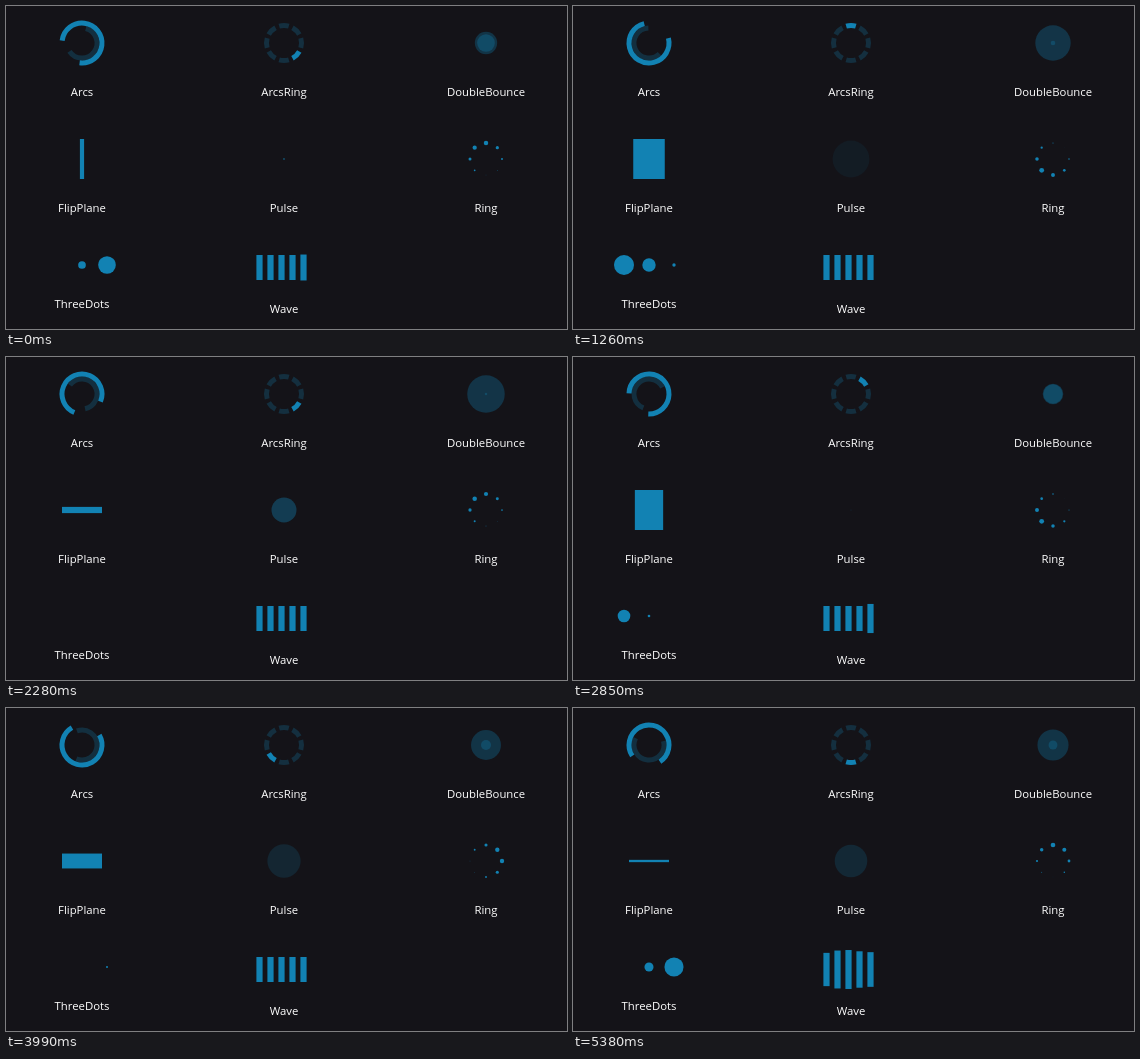
An HTML page for the animation above (5480 ms loop, 561x323 px).

```html
<!DOCTYPE html>
<html lang="en">
<head>
<meta charset="utf-8">
<title>Loading indicators</title>
<style>
  html, body { margin: 0; width: 100%; height: 100%; overflow: hidden; background: #141318; }
  svg { display: block; width: 561px; height: 323px; }
  text { font: 11.35px "Open Sans", "Noto Sans", sans-serif; fill: #fff; text-anchor: middle; }
</style>
</head>
<body>
<svg id="stage" viewBox="0 0 561 323"></svg>
<script>
const BLUE = '#1282b3';
const DIM = 0.25;
const LOOP = 5480;
const START = 19.558;   // indicator clock at the start of the loop, in seconds
const RATE = 1.053;     // indicator seconds per second of playback

// Runs of evenly spaced redraws: first, last, count.
const RUNS = [
  [0, 0, 1], [60, 600, 7], [690, 1170, 8], [1260, 1790, 9], [1850, 2340, 7],
  [2400, 2940, 9], [3000, 3530, 8], [3620, 4130, 8], [4190, 4670, 8],
  [4750, 5290, 9], [5380, 5380, 1]
];
const ticks = RUNS.flatMap(([first, last, count]) =>
  Array.from({ length: count }, (_, i) =>
    Math.round((first + (last - first) * i / Math.max(1, count - 1)) / 10) * 10));

const stage = document.getElementById('stage');

function add(tag, attrs) {
  const el = document.createElementNS('http://www.w3.org/2000/svg', tag);
  set(el, attrs);
  return stage.appendChild(el);
}

function set(el, attrs) {
  for (const key in attrs) el.setAttribute(key, attrs[key]);
}

const many = (count, make) => Array.from({ length: count }, (_, i) => make(i));
const mod = (a, b) => ((a % b) + b) % b;
const clamp = x => Math.max(0, Math.min(1, x));
const tri = x => 1 - Math.abs(2 * mod(x, 1) - 1);

function label(name, x, y) {
  add('text', { x, y }).textContent = name;
}

function dot(cx, cy, opacity = 1) {
  return add('circle', { cx, cy, r: 0, fill: BLUE, opacity });
}

// Angles in degrees, clockwise from the top.
function arc(cx, cy, r, from, span, opacity) {
  const at = deg => {
    const a = deg * Math.PI / 180;
    return `${cx + r * Math.sin(a)} ${cy - r * Math.cos(a)}`;
  };
  return add('path', {
    d: `M${at(from)}A${r} ${r} 0 ${span > 180 ? 1 : 0} 1 ${at(from + span)}`,
    fill: 'none', stroke: BLUE, 'stroke-width': 5, opacity
  });
}

label('Arcs', 76, 90);
label('ArcsRing', 278, 90);
label('DoubleBounce', 480, 90);
label('FlipPlane', 76, 206);
label('Pulse', 278, 206);
label('Ring', 480, 206);
label('ThreeDots', 76, 302);
label('Wave', 278, 307);

const outer = arc(76, 37, 20, 90, 270, 1);
const inner = arc(76, 37, 15, 295, 222, DIM);
const segments = many(8, i => arc(278, 37, 17.5, i * 45 - 16, 32, DIM));
const bounces = many(2, () => dot(480, 37, 0.3));
const plane = add('rect', { fill: BLUE });
const pulse = dot(278, 153);
const ring = many(8, i => {
  const a = i * Math.PI / 4;
  return dot(480 + 16 * Math.sin(a), 153 - 16 * Math.cos(a));
});
const trio = many(3, i => dot(51 + 25 * i, 259));
const bars = many(5, i => add('rect', { x: 250.4 + 11 * i, width: 6.2, fill: BLUE }));

function drawPlane(s) {
  const phase = mod(s, 1.6);
  const size = 40 * Math.abs(1 - 2.5 * (phase % 0.8));
  const w = phase < 0.8 ? size : 40;
  const h = phase < 0.8 ? 40 : size;
  set(plane, { x: 76 - w / 2, y: 153 - h / 2, width: w, height: h });
}

// Half a second up, a short hold, half a second down.
function swell(x) {
  return clamp(Math.min(2 * x, 2 * (1.1 - x)));
}

// All bars start rising together; each one peaks a little later than the last.
function barHeight(s, i) {
  const lead = 0.02;
  const x = mod(s + lead, 1);
  const peak = 0.13 + lead + 0.06 * i;
  const level = x < peak ? x / peak : 1 - (x - peak) / 0.2;
  return 25 + 15.5 * clamp(level);
}

function draw(ms) {
  const s = START + RATE * ms / 1000;

  set(outer, { transform: `rotate(${120 * s % 360} 76 37)` });
  set(inner, { transform: `rotate(${-180 * s % 360} 76 37)` });

  const lit = Math.floor(s * 10) % 8;
  segments.forEach((el, i) => set(el, { opacity: i === lit ? 1 : DIM }));

  const half = tri(s / 2);
  set(bounces[0], { r: 20 * half });
  set(bounces[1], { r: 20 * (1 - half) });

  drawPlane(s);

  const grow = mod(s / 1.5, 1);
  set(pulse, { r: 20 * grow, opacity: 1 - grow });

  ring.forEach((el, i) => set(el, { r: 2.5 * tri(s / 0.8 - i / 8) }));
  trio.forEach((el, i) => set(el, { r: 10 * swell(mod(s - 1.3 - 0.25 * i, 1.9)) }));
  bars.forEach((el, i) => {
    const height = barHeight(s, i);
    set(el, { y: 261.5 - height / 2, height });
  });
}

const begin = performance.now();
function frame() {
  const t = mod(performance.now() - begin, LOOP);
  draw(ticks.filter(tick => tick <= t).pop());
  requestAnimationFrame(frame);
}
frame();
</script>
</body>
</html>
```
